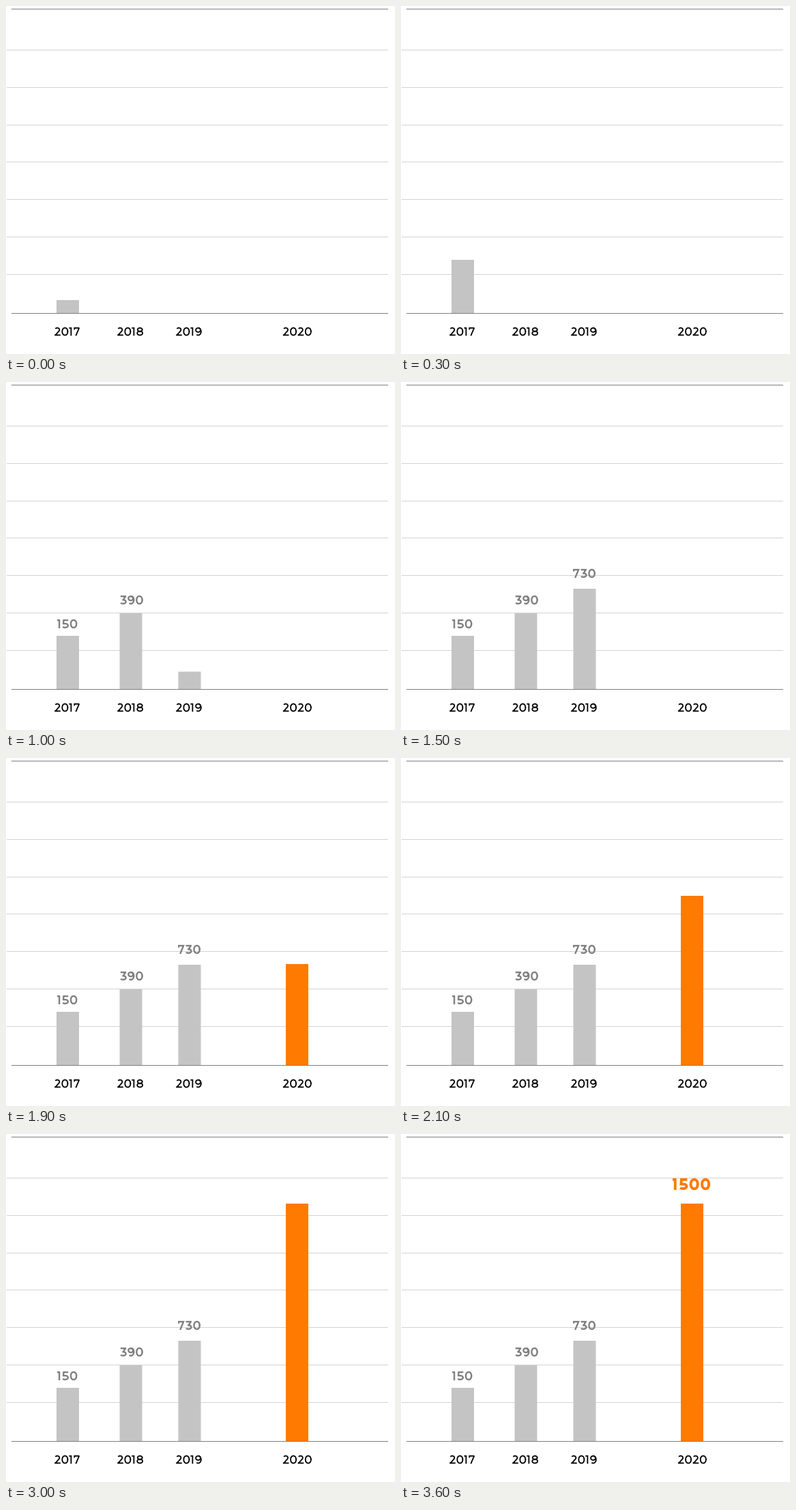
Animation, 570 px wide and 510 px high, one loop 8600 ms. Source, as a matplotlib script:

```python
import numpy as np
import matplotlib.pyplot as plt
from matplotlib.animation import FuncAnimation
from matplotlib.patches import Rectangle

W, H, DPI = 570, 510, 120
STEP_MS, STEPS = 100, 86
BASE, BAR_W = 450, 33
GREY, BAR_GREY, ORANGE = "#7f7f7f", "#c4c4c4", "#ff7a00"
CAP = 700  # digit height in 1/1000 em

# digit: (left bearing, ink width, advance) in 1/1000 em
METRICS = {
    "0": (52, 560, 664), "1": (10, 220, 362), "2": (30, 500, 573),
    "3": (15, 520, 572), "5": (22, 520, 585), "7": (45, 525, 600),
    "8": (45, 550, 640), "9": (33, 545, 617),
}


def arc(cx, cy, rx, ry, start=0, end=365, power=1.0):
    a = np.radians(np.linspace(start, end, 60))
    c, s = np.cos(a), np.sin(a)
    x = cx + rx * np.sign(c) * np.abs(c) ** power
    y = cy + ry * np.sign(s) * np.abs(s) ** power
    return list(zip(x, y))


def bowl(w, h, top):
    """Open lower bowl shared by 3 and 5."""
    cx = 0.45 * w
    return arc(cx, (top + h) / 2, w - h - cx, (top - h) / 2, 90, -142, 0.95)


def digit(ch, w, h):
    """Centre lines of a digit of ink width w drawn with half stroke h."""
    top = CAP - h
    if ch == "0":
        return [arc(w / 2, CAP / 2, w / 2 - h, CAP / 2 - h + 8, power=0.93)]
    if ch == "1":
        return [[(0, top), (w - h, top), (w - h, 0)]]
    if ch == "2":
        cx, cy = 0.47 * w, 495
        hook = arc(cx, cy, 0.94 * w - h - cx, top + 8 - cy, 148, -38)
        return [hook + [(1.6 * h, h)], [(0.02 * w, h), (w, h)]]
    if ch == "3":
        mid = 420 - h
        return [[(0.08 * w, top), (0.92 * w, top)],
                [(0.92 * w - h, top), (0.5 * w, mid)],
                [(0.34 * w, mid)] + bowl(w, h, mid)]
    if ch == "5":
        mid = 432 - h
        return [[(0.92 * w, top), (0.12 * w + h, top), (0.08 * w + h, mid)]
                + bowl(w, h, mid)]
    if ch == "7":
        return [[(h, 500), (h, top), (w - 1.6 * h, top), (0.32 * w, 0)]]
    if ch == "8":
        mid, cx = 368, w / 2
        return [arc(cx, (mid + h) / 2, cx - h, (mid - h) / 2 + 4),
                arc(cx, (mid + top) / 2, 0.9 * cx - h, (top - mid) / 2 + 4)]
    cx, ry = 0.46 * w, 225 - h
    return [arc(cx, top - ry, cx - h, ry),
            arc(cx, CAP / 2, w - h - cx, CAP / 2 - h + 6, 75, -122)]


fig = plt.figure(figsize=(W / DPI, H / DPI), dpi=DPI, facecolor="white")
ax = fig.add_axes([0, 0, 1, 1])
ax.set_xlim(0, W)
ax.set_ylim(H, 0)
ax.axis("off")


def number(text, left, baseline, size, weight, color):
    """Draw digits whose ink starts at left; weight is the stroke in 1/1000 em."""
    scale = size / 1000
    extra = 0.2 * (weight - 90)
    pen = -METRICS[text[0]][0]
    xs, ys = [], []
    for ch in text:
        bearing, width, advance = METRICS[ch]
        for stroke in digit(ch, width + extra, weight / 2):
            for x, y in stroke:
                xs.append(left + (pen + bearing + x) * scale)
                ys.append(baseline - y * scale)
            xs.append(np.nan)
            ys.append(np.nan)
        pen += advance + extra
    line, = ax.plot(xs, ys, color=color, lw=weight * scale * 72 / DPI,
                    solid_capstyle="butt", solid_joinstyle="miter", zorder=4)
    line.set_snap(False)
    return line


def rule(x, y, color, z):
    ax.add_patch(Rectangle((x, y), 560 - x, 1, fc=color, lw=0, zorder=z))


for y in (64, 119, 174, 228, 283, 338, 393):
    rule(1, y, "#d3d3d3", 1)
for y in (4, 450):
    rule(8, y, GREY, 3)

for year, x in (("2017", 71), ("2018", 163), ("2019", 249), ("2020", 405.7)):
    number(year, x, 483.2, 17.5, 103, "black")


class Column:
    """A bar that grows step by step and then shows its value."""

    def __init__(self, x, steps, heights, color, label, label_step):
        self.steps, self.heights = steps, heights
        self.label, self.label_step = label, label_step
        self.bar = Rectangle((x, BASE), BAR_W, 0, fc=color, lw=0, zorder=2,
                             snap=False)
        ax.add_patch(self.bar)

    def update(self, i):
        h = np.interp(i, self.steps, self.heights, left=0)
        self.bar.set_y(BASE - h)
        self.bar.set_height(h)
        self.label.set_visible(i >= self.label_step)


def value(text, x, y):
    return number(text, x, y, 18.7, 125, GREY)


total = number("1500", 398, 82, 24.3, 158, ORANGE)
columns = [
    Column(74, (0, 3), (19, 78), BAR_GREY, value("150", 75, 361), 4),
    Column(166.5, (5, 8), (21, 111), BAR_GREY, value("390", 167, 326), 9),
    Column(252.5, (10, 14), (25.5, 147), BAR_GREY, value("730", 252, 287), 15),
    Column(410, (16, 19, 23), (19, 148, 348), ORANGE, total, 24),
]


def update(i):
    for column in columns:
        column.update(i)
    # the total blinks three times
    if 26 <= i < 36 and (i - 26) % 4 < 2:
        total.set_visible(False)
    return [c.bar for c in columns] + [c.label for c in columns]


anim = FuncAnimation(fig, update, frames=STEPS, interval=STEP_MS,
                     repeat=True, repeat_delay=0, blit=False)
plt.show()
```
